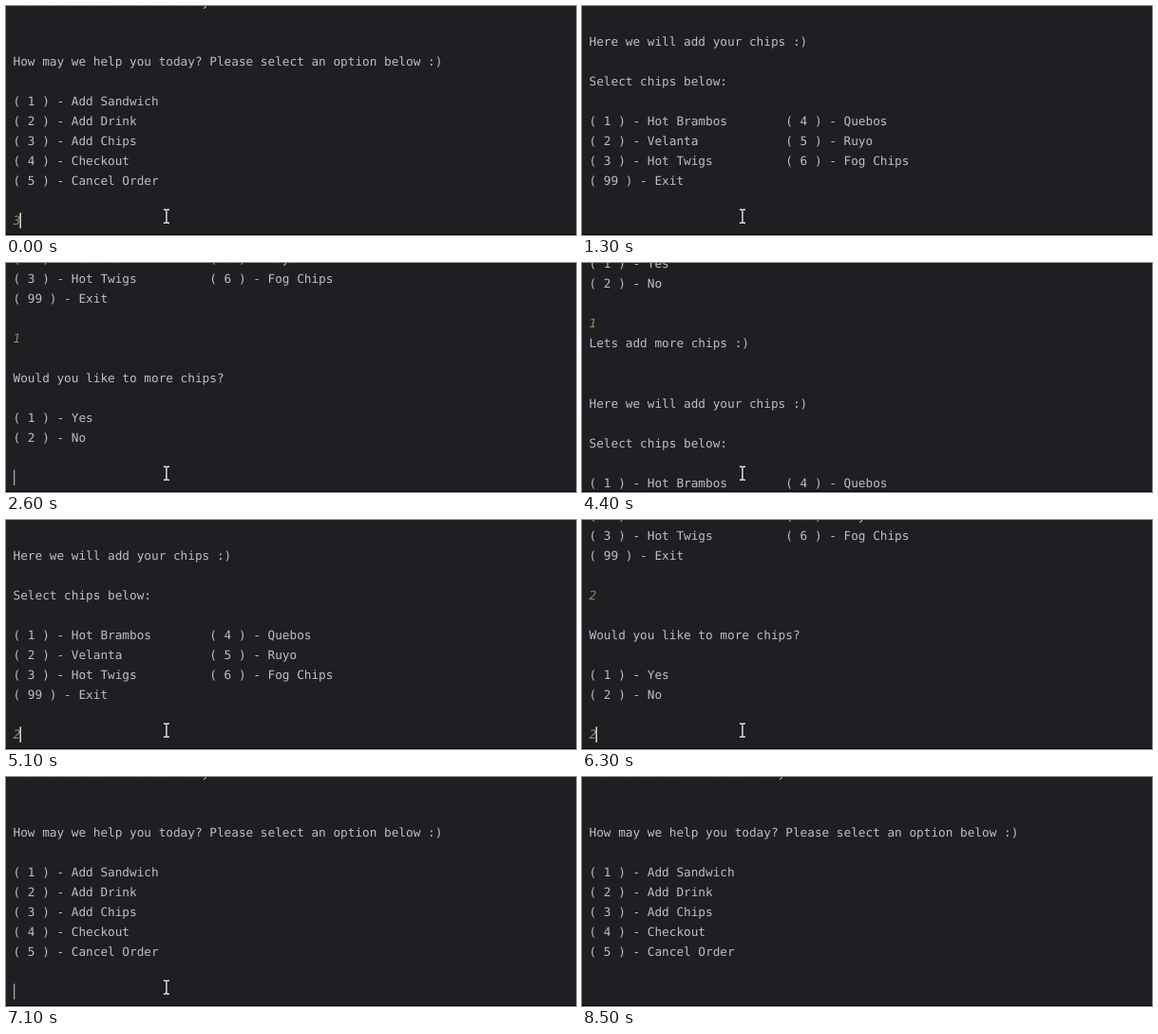
Recreate the animation shown at these times as an HTML page. Size 600 px wide and 242 px high, loop 8.6 s.

```html
<!DOCTYPE html>
<html lang="en">
<head>
<meta charset="utf-8">
<title>Console order menu</title>
<style>
  html, body { margin: 0; width: 100%; height: 100%; overflow: hidden; background: #1e1f22; }
  svg { display: block; width: 600px; height: 242px; }
  text {
    font-family: "DejaVu Sans Mono", "Noto Sans Mono", monospace;
    font-size: 12.73px;
    fill: #bcbec4;
    white-space: pre;
    text-rendering: geometricPrecision;
  }
  .input { fill: #819263; font-style: italic; }
</style>
</head>
<body>
<svg viewBox="0 0 600 242">
  <defs>
    <path id="beam" d="M-3 -7H-1L0 -6.2 1 -7H3M0 -6.5V6.5M-3 7H-1L0 6.2 1 7H3" fill="none"/>
  </defs>
  <rect width="600" height="242" fill="#1e1f22"/>
  <g id="log"></g>
  <rect id="caret" y="218.5" height="16.5" fill="#ced0d6"/>
  <g id="mouse" transform="translate(168.9 222.3)">
    <use href="#beam" stroke="#111214" stroke-width="3"/>
    <use href="#beam" stroke="#f2f2f2" stroke-width="1.4"/>
  </g>
  <rect y="241" width="600" height="1" fill="#060607"/>
</svg>
<script>
const LOOP = 8600, MOUSE_END = 7700, CARET_END = 8500, BLINK = 500;
const PITCH = 21.05, LEFT = 7.5, BASE = -0.3;
const PROMPT_ROW = 11;           // screen row of the prompt
const FRAME = 100, SPEED = 7.74; // rows scrolled per frame

const pair = (a, b) => a.padEnd(27) + b;

const menu = [
  "What else shall we do today?", "", "",
  "How may we help you today? Please select an option below :)", "",
  "( 1 ) - Add Sandwich",
  "( 2 ) - Add Drink",
  "( 3 ) - Add Chips",
  "( 4 ) - Checkout",
  "( 5 ) - Cancel Order", ""
];
const chips = [
  "", "",
  "Here we will add your chips :)", "",
  "Select chips below:", "",
  pair("( 1 ) - Hot Brambos", "( 4 ) - Quebos"),
  pair("( 2 ) - Velanta", "( 5 ) - Ruyo"),
  pair("( 3 ) - Hot Twigs", "( 6 ) - Fog Chips"),
  "( 99 ) - Exit", ""
];
const more = [
  "", "Would you like to more chips?", "",
  "( 1 ) - Yes",
  "( 2 ) - No", ""
];

// at: output printed, blink: caret starts blinking, typed: key pressed
const rounds = [
  { at: 0, typed: 0, key: "3", text: menu },
  { at: 300, blink: 500, typed: 2000, key: "1", text: chips },
  { at: 2500, blink: 2600, typed: 4100, key: "1", text: more },
  { at: 4400, blink: 4600, typed: 5100, key: "2", text: ["Lets add more chips :)", ...chips] },
  { at: 5300, blink: 5600, typed: 6300, key: "2", text: more },
  { at: 6900, blink: 7200, typed: LOOP, key: "", text: menu }
];

const byId = id => document.getElementById(id);
const log = byId("log"), caret = byId("caret"), mouse = byId("mouse");
const show = (el, on) => { el.style.display = on ? "" : "none"; };

const rows = [];
function addRow(str, cls = "") {
  const el = document.createElementNS("http://www.w3.org/2000/svg", "text");
  el.setAttribute("x", LEFT);
  el.setAttribute("y", BASE + rows.length * PITCH);
  el.setAttribute("class", cls);
  el.textContent = str;
  rows.push(log.appendChild(el));
}

for (const r of rounds) {
  r.text.forEach(str => addRow(str));
  r.prompt = rows.length;
  r.top = r.prompt - PROMPT_ROW;
  addRow(r.key, "input");
}

function draw(t) {
  const i = rounds.findLastIndex(r => r.at <= t);
  const r = rounds[i], from = i ? rounds[i - 1].top : r.top;
  const frames = 1 + Math.floor((t - r.at) / FRAME);
  const top = Math.min(r.top, from + SPEED * frames);
  const typed = t >= r.typed;
  const lit = typed || t < r.blink || Math.floor((t - r.blink) / BLINK) % 2 === 0;

  log.setAttribute("transform", `translate(0 ${-top * PITCH})`);
  rows.forEach((el, n) => show(el, n < r.prompt + typed));
  caret.setAttribute("x", typed ? 14.4 : 8.2);
  caret.setAttribute("width", typed ? 1.6 : 1);
  show(caret, lit && top === r.top && t < CARET_END);
  show(mouse, t < MOUSE_END);
}

const start = performance.now();
function tick() {
  draw((performance.now() - start) % LOOP);
  requestAnimationFrame(tick);
}
tick();
</script>
</body>
</html>
```
